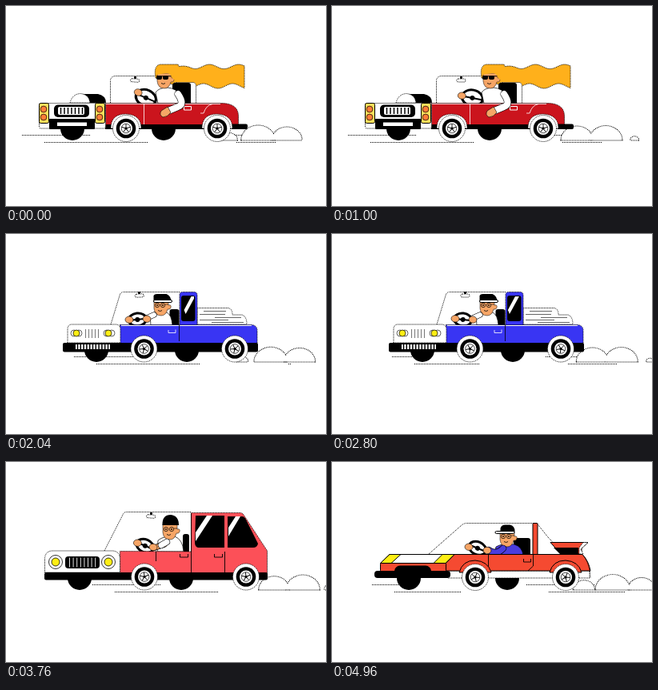
Animation, 400 px wide and 250 px high, one loop 5000 ms. Source, as an HTML page with a canvas:

```html
<!DOCTYPE html>
<html lang="en">
<head>
<meta charset="utf-8">
<title>Road trip</title>
<style>
html, body { margin: 0; width: 100%; height: 100%; overflow: hidden; background: #fff; }
canvas { display: block; width: 400px; height: 250px; }
</style>
</head>
<body>
<canvas id="stage" width="400" height="250"></canvas>
<script>
const ctx = document.getElementById('stage').getContext('2d');
const TAU = Math.PI * 2;
const LOOP = 5000;
const SKIN = '#f6a566', BLACK = '#000', WHITE = '#fff', YELLOW = '#ffee14';
const mod = (a, n) => ((a % n) + n) % n;

// Fills and outlines an SVG path; dotted edges border the white backdrop.
function shape(d, fill, line = BLACK, dotted = false, width = 1) {
  const path = typeof d === 'string' ? new Path2D(d) : d;
  if (fill) { ctx.fillStyle = fill; ctx.fill(path); }
  if (line) {
    ctx.setLineDash(dotted ? [1, 1] : []);
    ctx.strokeStyle = line;
    ctx.lineWidth = width;
    ctx.stroke(path);
    ctx.setLineDash([]);
  }
}
const outline = (d, fill = WHITE) => shape(d, fill, BLACK, true);
const line = (d, width = 1, color = BLACK) => shape(d, null, color, false, width);

function box(x, y, w, h, r, fill, stroke = null, dotted = false) {
  const path = new Path2D();
  path.roundRect(x, y, w, h, r);
  shape(path, fill, stroke, dotted);
}

function disc(x, y, r, fill, stroke = null, dotted = false, width = 1) {
  const path = new Path2D();
  path.arc(x, y, r, 0, TAU);
  shape(path, fill, stroke, dotted, width);
}

function bars(x, y, h, count, gap, color, width = 1) {
  for (let i = 0; i < count; i++) line(`M${x + i * gap} ${y}v${h}`, width, color);
}

function wheel(x, y, t) {
  disc(x, y, 16.5, WHITE, BLACK, true);
  disc(x, y, 12.3, BLACK);
  disc(x, y, 8, WHITE);
  disc(x, y, 5.8, null, BLACK, false, 0.7);
  ctx.save();
  ctx.translate(x, y);
  ctx.rotate(-t / 1000 * TAU * 1.6);
  for (let i = 0; i < 5; i++) {
    ctx.rotate(TAU / 5);
    line('M0 0V-5.5', 0.9);
  }
  ctx.restore();
  disc(x, y, 1.6, BLACK);
}

function speedLines(car, t) {
  const { ground, left, lineShift, exhaust } = car;
  [[-6.5, 0, 85], [2.5, 28, 130]].forEach(([dy, dx, length]) => {
    const min = left + dx, max = exhaust + 65;
    const start = mod(t * 0.24 + lineShift, 240) + dx;
    for (let x = start - 240; x < max; x += 240) {
      const a = Math.max(min, x), b = Math.min(max, x + length);
      if (b > a) outline(`M${Math.round(a)} ${ground + dy}H${Math.round(b)}`, null);
    }
  });
}

function smoke(car, t) {
  const cloud = new Path2D();
  for (let i = 0; i < 3; i++) {
    const p = mod(t / 800 + car.puffShift + i / 3, 1);
    const x = car.exhaust + 108 * p;
    const r = 21.5 * Math.sqrt(Math.sin(Math.PI * p));
    const y = car.ground - 0.5;
    cloud.moveTo(x - r, y);
    cloud.ellipse(x, y, r, r * 0.86, 0, Math.PI, TAU);
    cloud.closePath();
  }
  shape(cloud, null, BLACK, true, 2);
  shape(cloud, WHITE, null);
}

function limb(d, color, width) {
  ctx.lineCap = ctx.lineJoin = 'round';
  line(d, width + 1.2);
  line(d, width, color);
  ctx.lineCap = 'butt';
  ctx.lineJoin = 'miter';
}

function steering(x, y, sway, rx = 11, ry = 8) {
  ctx.save();
  ctx.translate(x, y);
  ctx.rotate(sway + 0.1);
  const rim = new Path2D();
  rim.ellipse(0, 3, rx, ry, 0, 0, TAU);
  shape(rim, null, BLACK, false, 3);
  line(`M${-rx} 3H${rx}`, 2);
  disc(0, 3, 3, BLACK);
  ctx.restore();
}

function hand(x, y, turn) {
  const path = new Path2D();
  path.ellipse(x, y, 5, 4.2, turn, 0, TAU);
  shape(path, SKIN, BLACK, false, 0.6);
}

function mirror(x, y, sway) {
  ctx.save();
  ctx.translate(x, y);
  box(-1.5, 0, 3, 3, 1, BLACK);
  ctx.rotate(sway * 0.25);
  const glass = new Path2D();
  glass.roundRect(-5.5, 3, 11, 4, 2);
  outline(glass);
  ctx.restore();
}

function face(x, y, shades) {
  shape(`M${x - 9} ${y - 8}h18v6q4 -1 3 3q-1 3 -4 2q-2 8 -8 8q-8 0 -9 -9z`, SKIN, BLACK, false, 0.5);
  if (shades) {
    box(x - 10, y - 5, 7, 5, 2, BLACK);
    box(x - 2, y - 5, 7, 5, 2, BLACK);
    line(`M${x - 10} ${y - 4.3}h19`, 1);
  } else {
    for (const dx of [-5, 2]) {
      disc(x + dx, y - 2, 2.7, null, BLACK, false, 0.7);
      disc(x + dx, y - 2, 0.9, BLACK);
    }
    line(`M${x + 5} ${y - 3}h4`, 0.6);
  }
  line(`M${x - 4} ${y + 4.5}q3 2 5 0`, 0.8);
}

function hair(t) {
  const wave = (x, shift) => Math.sin(x / 5.8 - t * TAU / 500 + shift);
  const path = new Path2D('M187 90Q184 73 194 73H215');
  for (let x = 216; x <= 298; x += 2) path.lineTo(x, 75.8 + wave(x, -1.43) * Math.min(2.8, (x - 214) / 8));
  for (let x = 298; x >= 234; x -= 2) path.lineTo(x, 100 + wave(x, -0.14) * 3);
  path.lineTo(208, 98);
  path.closePath();
  shape(path, '#ffb01b', BLACK, true);
}

function convertible(t, sway) {
  outline('M130.500 121V94q0 -6.500 7 -6.500H190', null);
  mirror(161.500, 88, sway);
  shape('M92 110H115Q125 112 125 121H92z', BLACK, null);
  outline('M80 121q3 -11 13 -11.500q11 1 12 11.500z');
  hair(t);
  box(208.500, 95.500, 29, 30, 4, WHITE, BLACK, true);
  box(208, 96, 23, 30, 3, BLACK);
  steering(176, 112, sway, 13, 10);
  shape('M190 122L187 108Q191 102 202 102Q213 103 218 112L221 122z', WHITE, BLACK, false, 0.7);
  face(198, 92, true);
  shape('M187 86Q188 77 200 79Q211 79 211 93L207 89Q206 84 200 84z', '#ffb01b', null);
  hand(161 + sway * 14, 114 - sway * 20, sway);

  shape('M124.500 121.500H270Q290 122 290.500 137V149H124.500z', '#cb141d', BLACK, true);
  line('M125 122.500H268', 0.8, WHITE);
  line('M172.500 122V148M243 134h4q3 -10 11 -11.500', 0.8, WHITE);
  box(222.500, 125.500, 9, 4.500, 0, null, WHITE);
  box(124, 148, 124, 6, 0, BLACK);
  box(281, 147.500, 21, 6.500, 2, BLACK);

  box(41.500, 121.500, 83, 31.500, 2, WHITE, BLACK, true);
  for (const x of [41.5, 111.5]) {
    box(x, 121.500, 12, 25, 2, '#ffdf5a', BLACK);
    for (const y of [129, 139]) disc(x + 5.5, y, 3.9, '#ff7d37', BLACK, false, 0.7);
  }
  box(60, 123.500, 44, 15.500, 5, BLACK);
  box(65, 126, 33, 10, 2, WHITE);
  bars(68.500, 127, 8, 7, 4.500, BLACK, 1.500);
  box(54, 141, 57, 13, 1, BLACK);
  box(64, 145.500, 37, 4.500, 0, WHITE);

  for (const x of [150, 264]) outline(`M${x - 19} 153q0 -18 19 -18q19 1 19 18z`);
  limb('M215 110Q224 123 215 126L203 131', WHITE, 8);
  shape('M202 126l4 7q-4 6 -10 6q-5 -3 -2 -8z', SKIN, BLACK, false, 0.6);
}

function pickup(t, sway) {
  const blue = '#3935f3';
  outline('M131 113L142 77q1 -4.500 5 -4.500H217', null);
  mirror(166.500, 72, sway);
  outline('M239 92.500h39q5 1 5 8.500h12q6 2 6 12H239z');
  line('M247 96.500h28M242 100.500h32M261 104.500h33M242 107.500h36M257 110.500h40', 0.6);
  box(204.500, 94, 12, 22, 3, BLACK);
  steering(164, 104, sway);
  shape('M181 114L180 101Q188 96 201 98Q207 101 208 114z', WHITE, BLACK, false, 0.7);
  face(194, 91, false);
  shape('M184.500 83V77q1 -2 4 -2h12q5 2 6 8z', BLACK, null);
  box(184.500, 82.500, 23, 3, 1.500, WHITE, BLACK);
  limb('M185 101L176 105', WHITE, 6);
  hand(154, 106 - sway * 6, 0.1);
  hand(176, 107 + sway * 4, 0.1);

  shape('M217 116V76q0 -3.500 4 -3.500h14q4 0 4 4V116z', blue, BLACK, true);
  box(219, 77, 17.500, 32, 3, BLACK);
  const gleam = mod(t - 2080, 1000) / 1000;
  if (gleam > 0.5) {
    ctx.save();
    ctx.beginPath();
    ctx.rect(220, 78, 15, 30);
    ctx.clip();
    shape(`M${212 + gleam * 11} 95l9 -17h5l-12 22z`, WHITE, null);
    ctx.restore();
  }
  shape('M142.500 113.500H307Q314 114 314 121V137H142.500z', blue, BLACK, true);
  line('M144 114.500H307', 1, WHITE);
  line('M216.500 113V134', 0.8);
  line('M203 120v3.500h9v-4', 0.8, WHITE);
  outline('M77 136V118q1 -5 5 -5h56q5 1 5 6v17z');
  for (const [x, dx] of [[88, -3], [128, -2]]) {
    disc(x + dx, 124, 4, WHITE, BLACK, false, 0.6);
    disc(x + dx + 6, 124, 4, WHITE, BLACK, false, 0.6);
    disc(x, 124, 4, YELLOW, BLACK, false, 0.7);
  }
  bars(99.500, 119, 11, 5, 4, '#555', 0.8);
  box(71, 136, 244, 11.500, 2, BLACK);
  box(87, 138, 43, 6, 0, WHITE);
  bars(89.500, 138, 6, 11, 3.800, BLACK, 1.500);
}

function wagon(t, sway) {
  const pink = '#fc5058';
  outline('M123 111L146 66q1 -3.500 5 -3.500H232', null);
  mirror(181.500, 63, sway);
  box(221, 90, 8, 24, 3, BLACK);
  steering(175, 102, sway);
  shape('M189 112L190 98Q197 92 211 93Q221 97 222 112z', WHITE, BLACK, false, 0.7);
  face(205, 86, false);
  shape('M195.500 79Q195 66 206 66Q216 67 216 79z', BLACK, null);
  limb('M198 103L186 107', SKIN, 6);
  limb('M201 100L194 104', WHITE, 7);
  hand(165 - sway * 2, 103 - sway * 6, 0.1);
  hand(184, 105 + sway * 5, 0.1);

  shape('M231.500 112V63.500H293q3 0 5 4L326.500 111V139H142.500V111.500z', pink, BLACK, true);
  shape('M237 67H273V107H240Q236 106 236 100z', BLACK, null);
  shape('M277 68H295Q298 68 300 72L315 102Q314 107 309 107H277z', BLACK, null);
  shape('M237 88L251 67h7L237 99z', WHITE, null);
  shape('M278 82L287 68h6L278 93z', WHITE, null);
  line('M187.500 112V124M231.500 64V138M273.500 112V138', 0.9);
  for (const x of [217.5, 260.5]) line(`M${x} 115v4h10v-4`, 0.9);
  outline('M48.500 138V120q1 -9 10 -9h75q9 1 9 10v17z');
  for (const x of [62, 128]) {
    disc(x, 125, 8.500, WHITE, BLACK, false, 0.8);
    disc(x, 125, 5, YELLOW, BLACK, false, 0.8);
  }
  box(74, 118, 43, 15, 4, BLACK);
  bars(79.500, 119.500, 12, 8, 4.600, WHITE, 0.9);
  box(48, 138, 279, 9.500, 2, BLACK);
}

function coupe(t, sway) {
  const red = '#f54a31', purple = '#4b3ddd';
  outline('M121 115L162 79q3 -2.500 6 -2.500H256L270 94L290 115', null);
  shape('M273 100.500H320L312 108V115H286z', red);
  shape('M314 100.500h6L311 109l3 6h-5v-8z', WHITE, BLACK, true);
  shape('M277 107H308V115H285z', BLACK, null);
  box(227, 95, 21, 23, 3, BLACK);
  steering(183, 105, sway);
  shape('M202 117L205 106Q213 101 228 103Q238 106 239 117z', purple, BLACK, false, 0.7);
  face(219, 95, false);
  shape('M210.500 87V83q1 -4.500 6 -4.500h6q6 1 6 8.500z', BLACK, null);
  box(204, 86.500, 24, 3, 1.500, WHITE, BLACK);
  limb('M214 108Q205 117 196 110', purple, 7);
  hand(171, 108 - sway * 6, 0.1);
  hand(194, 109 + sway * 5, 0.1);

  box(251, 76.500, 6, 42, 1, red, BLACK);
  outline('M145 136H322V145H145z');
  shape('M153 115.500H313Q321 124 323 136H142V127z', red);
  line('M195.500 116V136M251.500 116V130L245 136', 0.9);
  line('M239.500 121v4h9v-4', 0.9);
  outline('M313 115.500Q322 126 323 145', null);
  shape('M60.500 126.500L72 115.500H153L142 126.500z', WHITE, BLACK);
  shape('M60.500 126.500L72 115.500H86L74 126.500z', YELLOW);
  shape('M127 126.500L138 115.500H153L142 126.500z', YELLOW);
  box(60.500, 126.500, 82, 10, 1, red, BLACK);
  shape('M78 136Q79 130 85 129.500H117Q123 130 124 136z', BLACK, null);
  for (const x of [179, 292]) shape(`M${x - 20} 138Q${x - 16} 123 ${x} 123Q${x + 16} 124 ${x + 20} 138z`, red, BLACK);
  box(53, 136, 95, 9, 4, BLACK);
}

const cars = [
  { from: 0, draw: convertible, ground: 168, left: 15, exhaust: 272, puffShift: 0.4, lineShift: 20,
    wheels: [150, 264], far: [83, 197], axle: 153 },
  { from: 1040, draw: pickup, ground: 160, left: 75, exhaust: 291, puffShift: -0.18, lineShift: 75,
    wheels: [172.5, 286], far: [113, 226], axle: 143.5 },
  { from: 3040, draw: wagon, ground: 160, left: 60, exhaust: 305, puffShift: 0.245, lineShift: 166,
    wheels: [173, 300], far: [92, 219], axle: 143.5 },
  { from: 4040, draw: coupe, ground: 160, left: 50, exhaust: 302, puffShift: -0.08, lineShift: 13,
    wheels: [179, 292], far: [96, 219], axle: 144 }
];

function frame(now) {
  const t = Math.floor(mod(now, LOOP) / 40) * 40;
  const car = cars.findLast(c => t >= c.from);
  const sway = 0.3 * Math.cos(t * TAU / 1250);
  ctx.fillStyle = WHITE;
  ctx.fillRect(0, 0, 400, 250);
  speedLines(car, t);
  smoke(car, t);
  for (const x of car.far) disc(x, car.ground - 15, 15, BLACK);
  car.draw(t, sway);
  for (const x of car.wheels) wheel(x, car.axle, t);
  requestAnimationFrame(frame);
}
requestAnimationFrame(frame);
</script>
</body>
</html>
```
